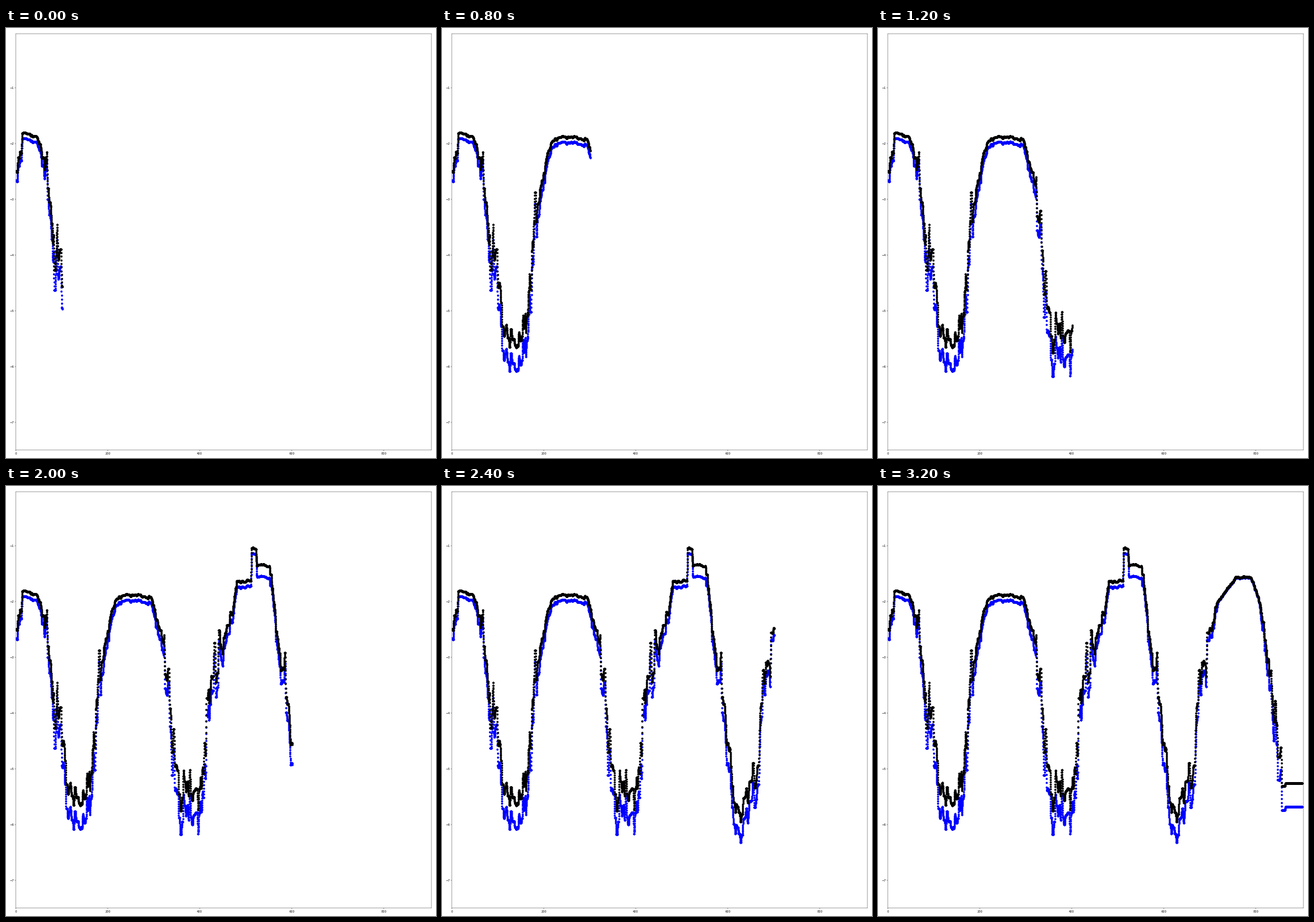
These frames come from a looping animation (748 px wide and 748 px high, 3.6 s). A matplotlib script:

```python
import numpy as np
import matplotlib.pyplot as plt
from matplotlib.animation import FuncAnimation

SIZE, DPI = 748, 36
FRAMES, INTERVAL = 9, 400
END, STEP, WINDOW = 903, 0.15, 10

# Outline of the hills and valleys
KEYS = [
    (0, -2.5), (13, -2.2), (13.1, -1.79), (46, -1.88), (66, -2.35),
    (80, -3.5), (92, -3.9), (115, -5.4), (145, -5.65), (166, -5.0),
    (178, -3.5), (207, -2.2), (218, -1.97), (240, -1.87), (294, -1.92),
    (328, -2.9), (338, -4.4), (357, -5.45), (405, -5.4), (418, -3.8),
    (440, -2.95), (472, -2.15), (480, -1.64), (511.9, -1.64), (512, -1.03),
    (523, -1.06), (523.1, -1.34), (552, -1.36), (575, -3.0), (590, -3.5),
    (618, -5.8), (670, -4.9), (675, -3.4), (717, -2.0), (756, -1.57),
    (790, -1.56), (810, -2.05), (845, -4.4), (864, -5.42), (END, -5.35),
]


def upper_signal(x):
    """Outline held in short steps, roughened on the slopes, then smoothed."""
    rng = np.random.default_rng(11)
    key_x, key_y = np.array(KEYS).T
    edges = np.union1d(np.cumsum(rng.uniform(1.2, 4, 340)), key_x)
    edges = edges[edges <= END]
    level = np.interp((edges[:-1] + edges[1:]) / 2, key_x, key_y)
    rough = np.interp(level, [-5.5, -4.4, -2.7, -2, -1],
                      [0.12, 0.25, 0.15, 0.01, 0.006])
    level += rough * np.clip(rng.laplace(0, 1, level.size), -3.2, 3.2)

    y = level[np.searchsorted(edges, x, side="right") - 1]
    padded = np.pad(y, (WINDOW // 2, WINDOW - 1 - WINDOW // 2), mode="edge")
    return np.convolve(padded, np.ones(WINDOW) / WINDOW, mode="valid")


def lower_signal(x, y):
    """Runs below the upper signal, further away the deeper it is."""
    gap = 0.1 + 0.33 * np.clip((-1.9 - y) / 3, 0, 1)
    scale = np.interp(x, [523, 525, 553, 557, 716, 718, 808, 810],
                      [1, 2.1, 2.1, 1, 0.7, 0.1, 0.1, 1])
    return y - gap * scale


x = np.arange(0, END, STEP)
upper = upper_signal(x)
lower = lower_signal(x, upper)

fig = plt.figure(figsize=((SIZE + 0.01) / DPI,) * 2, dpi=DPI, facecolor="white")
ax = fig.add_axes([17 / SIZE, 14 / SIZE, 722.5 / SIZE, 724 / SIZE])
ax.set(xlim=(0, END), ylim=(-7.495, -0.031),
       xticks=range(0, 801, 200), yticks=range(-7, 0))
ax.tick_params(labelsize=10)

blue, = ax.plot([], [], "bo", ms=6, mew=1.5)
black, = ax.plot([], [], "ko", ms=6, mew=1.5)


def draw(i):
    shown = x <= 101 + 100 * i
    blue.set_data(x[shown], lower[shown])
    black.set_data(x[shown], upper[shown])
    return blue, black


anim = FuncAnimation(fig, draw, frames=FRAMES, interval=INTERVAL,
                     repeat=True, repeat_delay=0)
plt.show()
```
